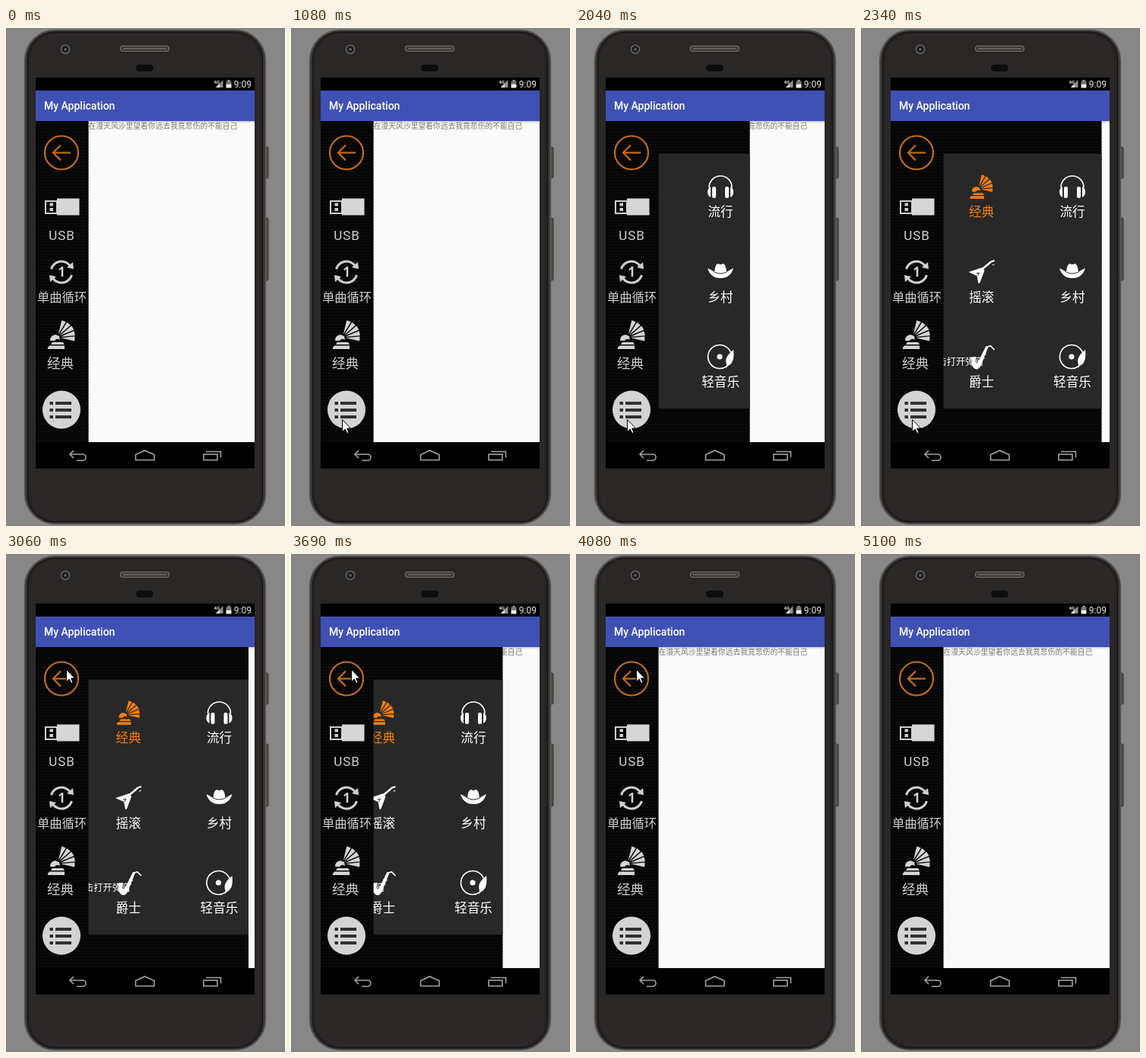
These frames come from a looping animation (367x653 px, 5430 ms). An HTML page with a canvas:

```html
<!DOCTYPE html>
<html lang="zh">
<head>
<meta charset="utf-8">
<title>Sliding menu</title>
<style>
html, body { margin: 0; width: 100%; height: 100%; overflow: hidden; background: #878787; }
canvas { display: block; }
</style>
</head>
<body>
<canvas id="stage" width="367" height="653"></canvas>
<script>
const ctx = document.getElementById('stage').getContext('2d');
const LOOP = 5430, STEP = 30;
const CJK = '"Noto Sans CJK SC", "Noto Sans CJK", sans-serif';
const ROBOTO = 'Roboto, sans-serif';
const LEFT = 108, OPEN_WIDTH = 211;

function rect(x, y, w, h, color) {
  ctx.fillStyle = color;
  ctx.fillRect(x, y, w, h);
}

function round(x, y, w, h, r, fill, stroke, lineWidth = 1) {
  ctx.beginPath();
  ctx.roundRect(x, y, w, h, r);
  if (fill) { ctx.fillStyle = fill; ctx.fill(); }
  if (stroke) { ctx.strokeStyle = stroke; ctx.lineWidth = lineWidth; ctx.stroke(); }
}

function circle(x, y, r, fill, stroke, lineWidth = 1) {
  round(x - r, y - r, 2 * r, 2 * r, r, fill, stroke, lineWidth);
}

function line(points, color, width, close) {
  ctx.beginPath();
  points.forEach(([x, y]) => ctx.lineTo(x, y));
  if (close) ctx.closePath();
  ctx.strokeStyle = color;
  ctx.lineWidth = width;
  ctx.stroke();
}

function shape(path, color) {
  ctx.fillStyle = color;
  ctx.fill(new Path2D(path));
}

function label(str, x, y, font, color, align = 'left') {
  ctx.font = font;
  ctx.textAlign = align;
  ctx.fillStyle = color;
  ctx.fillText(str, x, y);
}

function at(x, y, draw, scale = 1) {
  ctx.save();
  ctx.translate(x, y);
  ctx.scale(scale, scale);
  draw();
  ctx.restore();
}

function gramophone(color) {
  for (let i = 0; i < 5; i++) {
    const a = -1.3 + i * 0.31;
    ctx.beginPath();
    ctx.moveTo(-6 + 5 * Math.cos(a + 0.12), 4 + 5 * Math.sin(a + 0.12));
    ctx.arc(-6, 4, 24.5 - Math.abs(i - 2) * 0.5, a, a + 0.25);
    ctx.closePath();
    ctx.fillStyle = color;
    ctx.fill();
  }
  shape('M-15 8Q-15 1-8 0L-3 2L-2 7Q-6 4-9 8Z', color);
  shape('M-12 10H2L4 13H-14Z', color);
  shape('M-16 14.5H4V19H-18V17Z', color);
}

function headphones(color) {
  ctx.beginPath();
  ctx.arc(0, 1, 15, Math.PI, 0);
  ctx.strokeStyle = color;
  ctx.lineWidth = 1.6;
  ctx.stroke();
  for (const side of [-1, 1]) {
    at(0, 0, () => {
      ctx.scale(side, 1);
      round(6, 0, 5, 15, 2, color);
      shape('M13 0Q17 2 17 7Q17 12 13 14Z', color);
    });
  }
}

function hat(color) {
  shape('M-17-5Q-12-3-8 0Q-7-11-3-11Q0-9 3-11Q7-11 8 0Q12-3 17-5Q13 8 0 8Q-13 8-17-5Z', color);
  ctx.beginPath();
  ctx.moveTo(-8, 0);
  ctx.quadraticCurveTo(0, 4, 8, 0);
  ctx.strokeStyle = '#282828';
  ctx.lineWidth = 1;
  ctx.stroke();
}

function disc(color) {
  ctx.beginPath();
  ctx.arc(-1, 0, 15.5, 0.95, 5.9);
  ctx.strokeStyle = color;
  ctx.lineWidth = 1.6;
  ctx.stroke();
  circle(-1, 0, 3.6, color);
  shape('M17-9Q19 8 10 12L7 15L8 10Q4 1 17-9Z', color);
}

function guitar(color) {
  shape('M-17 0L1-6L4-2L-2 14L-4 15L-6 5Z', color);
  line([[0, -3], [12, -13]], color, 2.5);
  line([[11, -13], [17, -15]], color, 2);
  line([[14, -9], [17, -10]], color, 1);
  line([[-7, 2], [-3, 1], [-5, 5]], '#282828', 1);
}

function sax(color) {
  shape('M6-14L9-13L-1 12Q-5 19-10 15Q-14 12-12 5L-16 1L-7 0Q-9 7-7 9Q-5 9-3 4Z', color);
  line([[7, -13], [12, -14], [17, -9]], color, 1.7);
  line([[1, -4], [6, -3]], color, 1.5);
  line([[-1, 1], [4, 2]], color, 1.5);
}

function repeatOne() {
  const color = '#d0d0d0';
  for (const turn of [0, Math.PI]) {
    at(0, 0, () => {
      ctx.rotate(turn);
      ctx.beginPath();
      ctx.arc(0, 0, 14, -2.85, -0.65);
      ctx.strokeStyle = color;
      ctx.lineWidth = 3;
      ctx.stroke();
      shape('M7-6L16-4L15-13Z', color);
    });
  }
  label('1', 0, 6, 'bold 17px "Open Sans", sans-serif', color, 'center');
}

function phone() {
  rect(0, 0, 367, 653, '#878787');
  round(340, 156, 5, 41, 2, '#54504d', '#35322f');
  round(340, 249, 5, 82, 2, '#54504d', '#35322f');
  round(24.5, 2.5, 317, 648, 40, '#3b3836', '#5e5955', 1.5);
  round(28.5, 5.5, 309, 642, 36, '#272424', '#161414', 1.5);
  round(33.5, 9.5, 299, 634, 32, '#2a2727', '#302d2c');
  circle(78, 28, 5.5, '#1c1b1c', '#696664', 1.5);
  circle(78, 28, 2, '#55565a');
  round(150.5, 23.5, 64, 7, 3.5, '#3b3938', '#77716d', 1.2);
  line([[154, 27], [211, 27]], '#66615d', 2);
  round(171, 48, 23, 9, 4.5, '#0d0c0d');
}

function systemBars() {
  rect(39, 65, 288, 17, '#000');
  label('4G', 273.5, 73, 'bold 6px ' + ROBOTO, '#e8e8e8');
  shape('M285.5 68V78H276Z', '#8f8f8f');
  shape('M281 73V78H276Z', '#eee');
  rect(291.5, 68, 3, 2, '#aaa');
  rect(289.5, 69.5, 7, 4, '#777');
  rect(289.5, 73.5, 7, 5, '#eee');
  label('9:09', 323, 78, '12px ' + ROBOTO, '#e6e6e6', 'right');
  rect(39, 82, 288, 40, '#3f51b5');
  label('My Application', 50, 107, '500 14px ' + ROBOTO, '#fff');

  rect(39, 543, 288, 34.5, '#000');
  const gray = '#a2a2a2';
  ctx.beginPath();
  ctx.moveTo(89, 554);
  ctx.lineTo(84, 559);
  ctx.lineTo(89, 564);
  ctx.moveTo(84, 559);
  ctx.lineTo(101, 559);
  ctx.arc(101, 563, 4, -Math.PI / 2, Math.PI / 2);
  ctx.lineTo(93, 567);
  ctx.strokeStyle = gray;
  ctx.lineWidth = 1.6;
  ctx.stroke();
  line([[170.5, 566.5], [170.5, 559.5], [182.5, 554], [195, 559.5], [195, 566.5]], gray, 1.6, true);
  ctx.strokeRect(260, 559, 18, 7.5);
  line([[263, 555.5], [282.5, 555.5], [282.5, 563]], gray, 1.6);
}

function page() {
  rect(LEFT, 122, 219, 421.5, '#fafafa');
  const shadow = ctx.createLinearGradient(0, 122, 0, 125);
  shadow.addColorStop(0, '#c8c8cc');
  shadow.addColorStop(1, '#fafafa');
  rect(LEFT, 122, 219, 3, shadow);
  label('在漫天风沙里望着你远去我竟悲伤的不能自己', 108.5, 132, '9.8px ' + CJK, '#777');
}

function weave(x, w) {
  for (let y = 124; y < 543; y += 4) rect(x, y, w, 1, '#0c0c0c');
}

function panel(edge) {
  if (edge <= LEFT) return;
  ctx.save();
  ctx.beginPath();
  ctx.rect(LEFT, 122, edge - LEFT, 421.5);
  ctx.clip();
  rect(LEFT, 122, OPEN_WIDTH, 422, '#050505');
  weave(LEFT, OPEN_WIDTH);
  rect(LEFT, 165, OPEN_WIDTH, 334, '#282828');
  const rows = [
    [208, ['经典', gramophone], ['流行', headphones]],
    [320, ['摇滚', guitar], ['乡村', hat]],
    [431, ['爵士', sax], ['轻音乐', disc]]
  ];
  for (const [y, ...cells] of rows) {
    cells.forEach(([name, icon], col) => {
      const x = edge - (col ? 38.5 : 158);
      const color = icon === gramophone ? '#f57c0c' : '#fff';
      at(x, y, () => icon(color), icon === gramophone ? 0.84 : 1);
      label(name, x, y + 39, '16.6px ' + CJK, color, 'center');
    });
  }
  label('点击打开弹窗', edge - 155, 441.5, '12.2px ' + CJK, '#fff', 'right');
  ctx.restore();
}

function sidebar() {
  const light = '#cfcfcf';
  rect(39, 122, 69.5, 421.5, '#050505');
  weave(39, 69.5);

  circle(73, 163.5, 22, null, '#c46c14', 2.2);
  line([[85, 163.5], [62, 163.5]], '#c46c14', 2.2);
  line([[72, 153.5], [62, 163.5], [72, 173.5]], '#c46c14', 2.2);

  ctx.strokeStyle = light;
  ctx.lineWidth = 2;
  ctx.strokeRect(52, 227, 15, 16);
  rect(57.5, 229.5, 4.5, 4, light);
  rect(57.5, 236, 4.5, 4, light);
  rect(67, 223.5, 29.5, 22, '#d6d6d6');
  ctx.letterSpacing = '1px';
  label('USB', 73.5, 278, '17px ' + ROBOTO, light, 'center');
  ctx.letterSpacing = '0px';

  at(73, 320, repeatOne);
  label('单曲循环', 73.5, 359, '16.3px ' + CJK, light, 'center');
  at(73, 402, () => gramophone('#d4d4d4'));
  label('经典', 71.5, 446, '17.6px ' + CJK, light, 'center');

  circle(73, 500.5, 25, '#d3d3d3');
  for (const y of [490, 499, 508]) {
    rect(57.5, y, 4.5, 4, '#303030');
    rect(65, y, 21, 4, '#303030');
  }
}

// Cubic Bezier between cursor positions
function along(u, a, b, c, d) {
  const v = 1 - u;
  return [0, 1].map(i =>
    v * v * v * a[i] + 3 * v * v * u * b[i] + 3 * v * u * u * c[i] + u * u * u * d[i]);
}

const progress = (t, start, end) => Math.min(1, Math.max(0, (t - start) / (end - start)));

function cursorAt(t) {
  const list = [67, 513], back = [79, 151];
  if (t < 420 || t >= 5100) return null;
  if (t < 2595) {
    const u = 1 - (1 - progress(t, 400, 1080)) ** 1.3;
    return along(u, [367, 497], [267, 668], [167, 532], list);
  }
  if (t < 4725) {
    const p = progress(t, 2595, 3060);
    return along(p * p * (3 - 2 * p), list, [85, 400], [84, 260], back);
  }
  const u = progress(t, 4725, 5100) ** 1.4;
  return along(u, back, [165, 125], [270, 65], [370, 20]);
}

function panelEdge(t) {
  const opened = 1 - (1 - progress(t, 1850, 2400)) ** 2;
  const closed = progress(t, 3413, 4045) ** 2;
  return LEFT + OPEN_WIDTH * (opened - closed);
}

function cursor([x, y]) {
  at(Math.round(x), Math.round(y), () => {
    const path = new Path2D('M.5.5V16.5L4.2 13L6.8 18.5L9 17.5L6.6 12H11.5Z');
    ctx.fillStyle = '#fff';
    ctx.fill(path);
    ctx.strokeStyle = '#000';
    ctx.lineWidth = 1;
    ctx.stroke(path);
  });
}

function render(t) {
  phone();
  page();
  panel(panelEdge(t));
  sidebar();
  systemBars();
  const pos = cursorAt(t);
  if (pos) cursor(pos);
}

let origin;
function tick(now) {
  origin ??= now;
  const t = (now - origin) % LOOP;
  render(Math.floor(t / STEP) * STEP);
  requestAnimationFrame(tick);
}
render(0);
requestAnimationFrame(tick);
</script>
</body>
</html>
```
